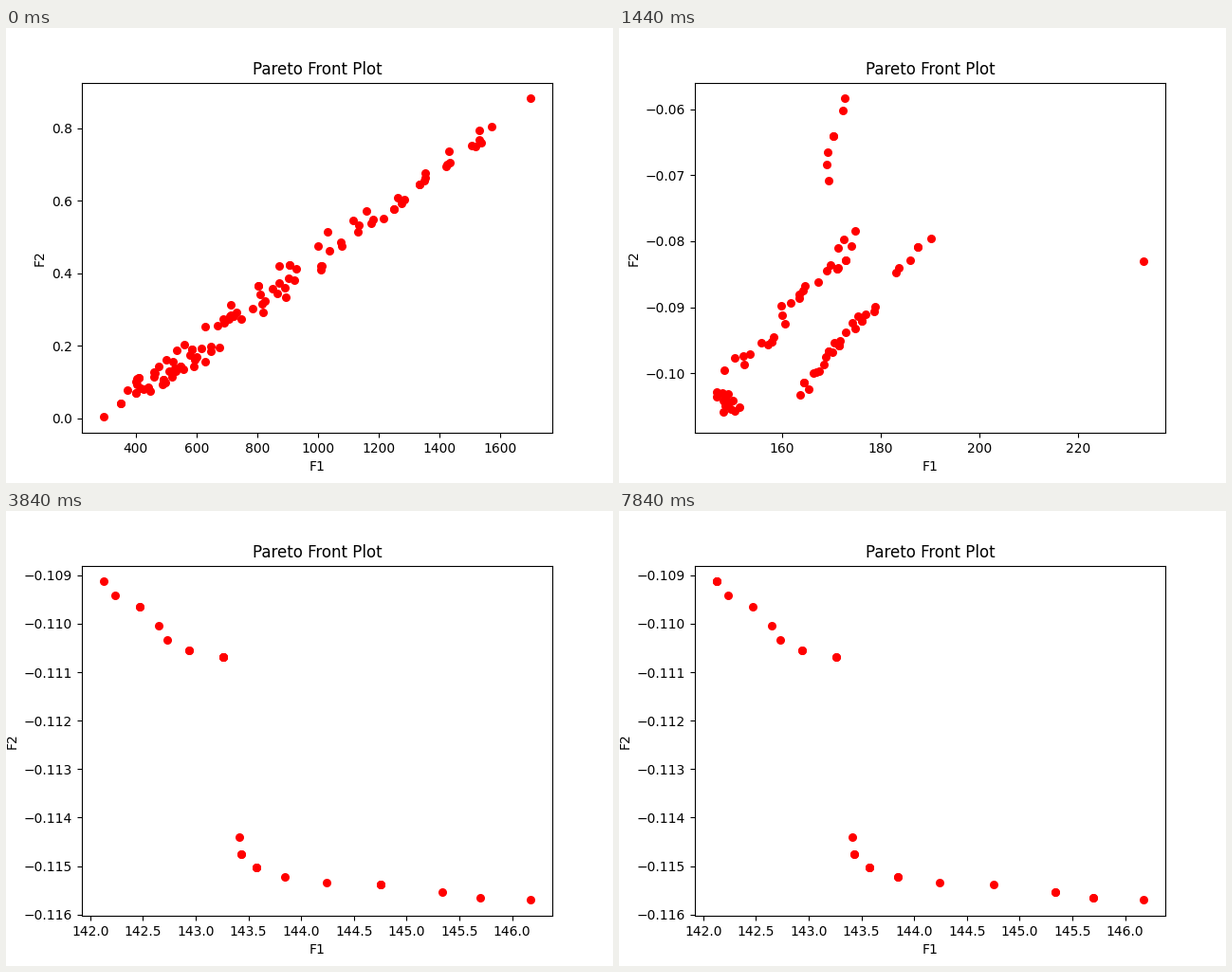
Write a matplotlib script that moves like this. It is 640 by 480 pixels and loops after 8000 ms.

```python
import numpy as np
import matplotlib.pyplot as plt
from matplotlib.animation import FuncAnimation

W, H, DPI = 640, 480, 100
LEFT, RIGHT, TOP, BOTTOM = 80, 576, 57.6, 427.2
# Outermost dot centres: the axes keep a 5% margin around the data
X_MIN, X_MAX, Y_MIN, Y_MAX = 102.55, 553.45, 74.4, 410.4
FRAMES, INTERVAL = 50, 160
SETTLED = 20

# Strands of scattered dots on the stage: x0, y0, x1, y1, count, spread
START = [
    (103, 410, 103, 410, 1, 0), (130, 385, 207, 338, 36, 12),
    (207, 330, 300, 268, 26, 16), (300, 260, 395, 192, 17, 15),
    (400, 192, 514, 104, 19, 9), (553, 74, 553, 74, 1, 0),
]
EARLY = [
    (103, 396, 111, 410, 2, 0), (210, 345, 300, 345, 14, 24),
    (230, 388, 300, 392, 5, 5), (345, 285, 430, 290, 18, 16),
    (350, 225, 470, 255, 20, 15), (500, 248, 553, 252, 5, 8),
    (375, 74, 422, 100, 5, 10),
]
MIDDLE = [
    (106, 388, 122, 400, 14, 8), (118, 358, 170, 318, 10, 7),
    (166, 305, 256, 218, 17, 9), (191, 383, 267, 290, 21, 6),
    (215, 165, 239, 76, 6, 9), (290, 262, 325, 225, 5, 5),
    (553, 246, 553, 246, 1, 0),
]
LATE = [
    (104, 230, 190, 210, 14, 11), (195, 202, 268, 195, 9, 6),
    (152, 109, 262, 140, 10, 14), (275, 315, 350, 235, 11, 9),
    (337, 348, 460, 342, 9, 8), (396, 262, 423, 243, 5, 7),
    (271, 404, 391, 404, 7, 4), (501, 409, 553, 349, 4, 5),
]
FRONT = [
    (X_MIN, Y_MIN), (115, 89), (141, 101), (161, 121), (170, 136), (193, 147),
    (229, 154), (246, 344), (248, 362), (264, 376), (294, 386), (338, 392),
    (395, 394), (460, 402), (500, 408), (X_MAX, Y_MAX),
]


def scatter_strands(strands, seed):
    rng = np.random.default_rng(seed)
    parts = []
    for x0, y0, x1, y1, n, spread in strands:
        line = np.linspace((x0, y0), (x1, y1), n)
        parts.append(line + rng.uniform(-spread, spread, (n, 2)))
    return np.clip(np.vstack(parts), (X_MIN, Y_MIN), (X_MAX, Y_MAX))


def generation(points, xlim, ylim):
    """Turn stage positions into values sorted by F1, with their limits."""
    x, y = np.array(points, float).T
    f1 = xlim[0] + (x - LEFT) / (RIGHT - LEFT) * (xlim[1] - xlim[0])
    f2 = ylim[0] + (BOTTOM - y) / (BOTTOM - TOP) * (ylim[1] - ylim[0])
    values = np.column_stack([f1, f2])
    return values[np.argsort(f1)], np.array([xlim, ylim])


GENERATIONS = {
    0: generation(scatter_strands(START, 1),
                  (222.5, 1771.3), (-0.0407, 0.9256)),
    3: generation(scatter_strands(EARLY, 2),
                  (242.3, 440.5), (-0.03705, 0.13285)),
    9: generation(scatter_strands(MIDDLE, 3),
                  (142.3, 237.7), (-0.10906, -0.05596)),
    14: generation(scatter_strands(LATE, 4),
                   (142.883, 149.006), (-0.114904, -0.104812)),
    SETTLED: generation(FRONT, (141.9205, 146.3817), (-0.116028, -0.108801)),
}


def resample(points, n):
    return points[np.linspace(0, len(points) - 1, n).round().astype(int)]


def population(gen):
    gen = min(gen, SETTLED)
    if gen in GENERATIONS:
        return GENERATIONS[gen]
    a = max(k for k in GENERATIONS if k < gen)
    b = min(k for k in GENERATIONS if k > gen)
    t = 1 - (1 - (gen - a) / (b - a)) ** 2
    (old, old_lims), (new, new_lims) = GENERATIONS[a], GENERATIONS[b]
    n = max(len(old), len(new))
    points = (1 - t) * resample(old, n) + t * resample(new, n)
    return points, (1 - t) * old_lims + t * new_lims


fig, ax = plt.subplots(figsize=(W / DPI, H / DPI), dpi=DPI)
ax.set_title("Pareto Front Plot")
ax.set_xlabel("F1")
ax.set_ylabel("F2")
dots = ax.scatter([], [], s=30, c="red")


def draw(gen):
    points, (xlim, ylim) = population(gen)
    # Repeated members make some dots look slightly heavier
    twins = np.random.default_rng(gen).integers(0, len(points), 10)
    dots.set_offsets(np.vstack([points, points[twins]]))
    ax.set_xlim(*xlim)
    ax.set_ylim(*ylim)
    return dots,


anim = FuncAnimation(fig, draw, frames=FRAMES, interval=INTERVAL,
                     repeat=True, repeat_delay=0, blit=False)
plt.show()
```
